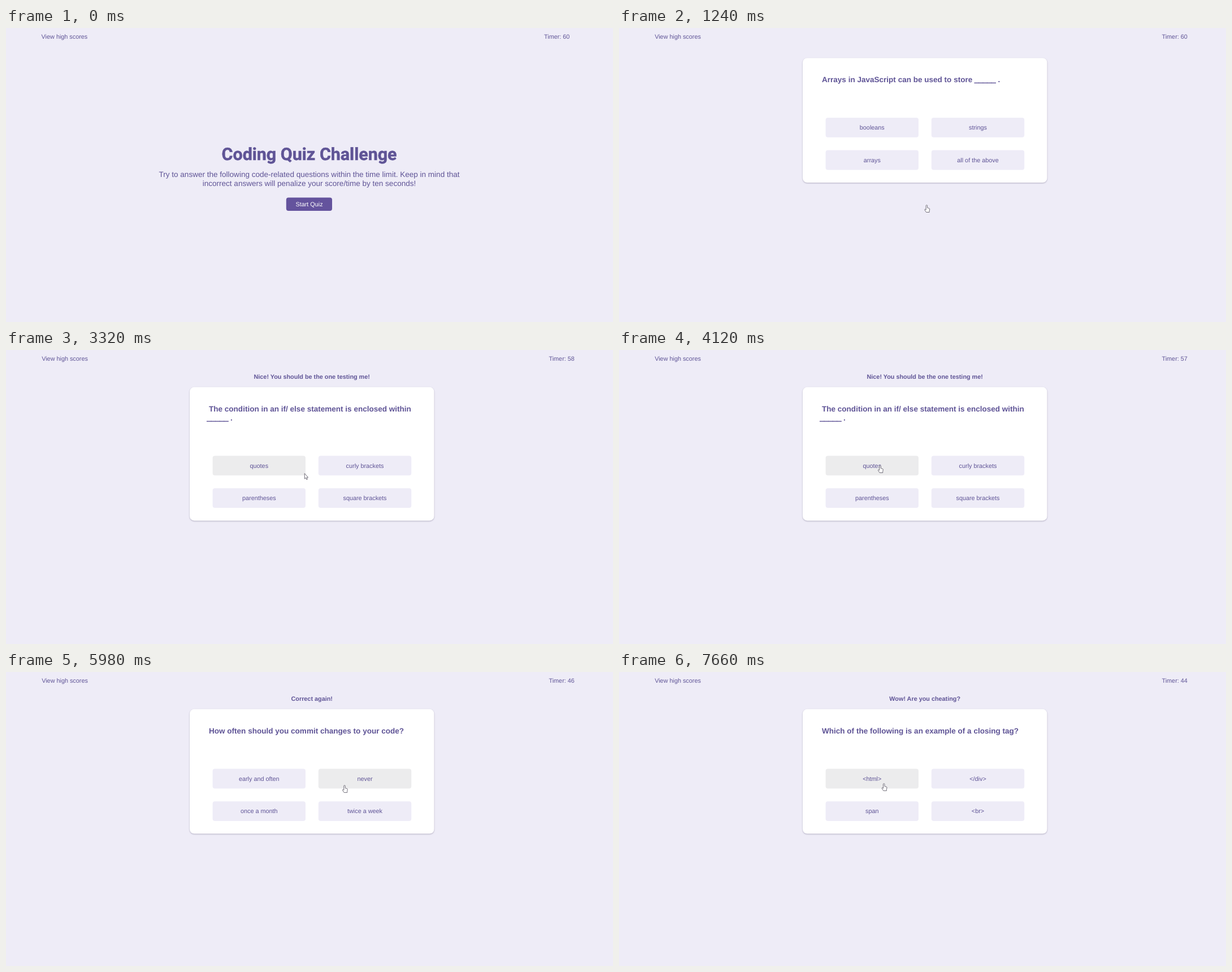
Animation of 1074x521 px, one loop 7.99 s. Source, as an HTML page:

```html
<!DOCTYPE html>
<html lang="en">
<head>
<meta charset="utf-8">
<title>Coding quiz</title>
<style>
  html, body { margin: 0; width: 100%; height: 100%; overflow: hidden; background: #eeecf7; }
  svg { display: block; width: 1074px; height: 521px; }
  text {
    font: 10.83px "Liberation Sans", Arial, sans-serif;
    fill: #5f5496; white-space: pre; text-rendering: geometricPrecision;
  }
  .mid { text-anchor: middle; }
  .end { text-anchor: end; }
  .bold { font-weight: 700; }
  .big { font-size: 13.54px; }
  .title { font: 700 30.4px Roboto, "Liberation Sans", sans-serif; stroke: #5f5496; stroke-width: .5; }
  .blank { stroke: #5f5496; stroke-width: .9; }
  .light { fill: #fff; }
  .card { fill: #fff; filter: drop-shadow(0 1px 1.2px rgba(50, 40, 80, .32)); }
  .choice { fill: #eeecf7; }
  .choice.over { fill: #ececed; }
  .start { fill: #64539d; }
  .pointer path { fill: #fff; stroke: #625f6b; stroke-width: .9; stroke-linejoin: round; }
</style>
</head>
<body>
<svg viewBox="0 0 1074 521"></svg>
<script>
const LOOP = 7990;
const LINE = 15.8, ROW = 57.6, COLUMN = 187.2;
const svg = document.querySelector('svg');

function add(parent, tag, attrs, text) {
  const el = document.createElementNS('http://www.w3.org/2000/svg', tag);
  for (const key in attrs) el.setAttribute(key, attrs[key]);
  if (text) el.textContent = text;
  parent.append(el);
  return el;
}
const label = (parent, x, y, text, cls = '') => add(parent, 'text', { x, y, class: cls }, text);
const box = (parent, x, y, width, height, rx, cls) =>
  add(parent, 'rect', { x, y, width, height, rx, class: cls });

const quiz = [
  { at: 1240, lines: ['Arrays in JavaScript can be used to store _____ .'],
    choices: ['booleans', 'strings', 'arrays', 'all of the above'] },
  { at: 2760, note: 'Nice! You should be the one testing me!',
    lines: ['The condition in an if/ else statement is enclosed within', '_____ .'],
    choices: ['quotes', 'curly brackets', 'parentheses', 'square brackets'] },
  { at: 4780, note: 'Nice try!',
    lines: ['A very useful tool used during development and',
      'debugging for printing content to the debugger is _____ .'],
    choices: ['JavaScript', 'console.log', 'terminal', 'Plenvo Sites'] },
  { at: 5980, note: 'Correct again!',
    lines: ['How often should you commit changes to your code?'],
    choices: ['early and often', 'never', 'once a month', 'twice a week'] },
  { at: 7020, note: 'Wow! Are you cheating?',
    lines: ['Which of the following is an example of a closing tag?'],
    choices: ['<html>', '</div>', 'span', '<br>'] }
];

function intro() {
  const g = add(svg, 'g');
  label(g, 536.5, 234.3, 'Coding Quiz Challenge', 'title mid');
  label(g, 536.5, 264.3, 'Try to answer the following code-related questions within the time limit. Keep in mind that', 'big mid');
  label(g, 536.5, 280.1, 'incorrect answers will penalize your score/time by ten seconds!', 'big mid');
  const start = { x: 495.8, y: 300.5, w: 81.2, h: 23.6 };
  box(g, start.x, start.y, start.w, start.h, 4, 'start');
  label(g, 536.5, 315.9, 'Start Quiz', 'mid light');
  return { at: 0, g, buttons: [start] };
}

// Question text with heavier strokes for the gap to fill in
function prompt(g, x, y, line) {
  const el = label(g, x, y, '', 'bold big');
  for (const part of line.split(/(_+)/))
    add(el, 'tspan', { class: part.startsWith('_') ? 'blank' : '' }, part);
}

function question({ at, note, lines, choices }) {
  const g = add(svg, 'g');
  const top = note ? 65.8 : 53.2;
  const extra = (lines.length - 1) * LINE;
  if (note) label(g, 541.2, 51.4, note, 'bold mid');
  box(g, 325, top, 432.5, 220.8 + extra, 8, 'card');
  lines.forEach((line, i) => prompt(g, i ? 355.6 : 359, top + 43.2 + i * LINE, line));
  const buttons = choices.map((choice, i) => {
    const b = {
      x: 365.6 + (i % 2) * COLUMN,
      y: top + 105.8 + extra + (i >> 1) * ROW,
      w: 164.4, h: 34.8
    };
    b.el = box(g, b.x, b.y, b.w, b.h, 4, 'choice');
    label(g, b.x + b.w / 2, b.y + 21.1, choice, 'mid');
    return b;
  });
  return { at, g, buttons };
}

const scores = label(svg, 0, 18.5, 'View high scores');
const timer = label(svg, 0, 18.5, '', 'end');
const scenes = [intro(), ...quiz.map(question)];

const pointer = add(svg, 'g', { class: 'pointer' });
const hand = add(pointer, 'path', {
  d: 'M-1.2 .9Q0-.6 1.2 .9V5.2L4.4 6Q5.4 6.3 5.3 7.6L4.7 11V13H-.8L-3.4 9.2Q-4 7.7-2.6 7.6L-1.2 8.8Z'
});
const arrow = add(pointer, 'path', { d: 'M0 0V9.6L2.1 7.7L3.6 11L5.1 10.3L3.7 7.2H6.3Z' });

// Places where the pointer rests
const stops = [
  { arrive: 670, leave: 670, x: 595, y: 318 },
  { arrive: 990, leave: 1400, x: 544.4, y: 313.5 },
  { arrive: 2040, leave: 2160, x: 457, y: 238 },
  { arrive: 2600, leave: 2840, x: 595, y: 233 },
  { arrive: 3800, leave: 4780, x: 462, y: 204.5 },
  { arrive: 5180, leave: 5180, x: 525.2, y: 230 },
  { arrive: 5820, leave: 5980, x: 599, y: 200.6 },
  { arrive: 6860, leave: LOOP, x: 468.7, y: 197.4 }
];

const ease = k => (1 - Math.cos(Math.PI * k)) / 2;
const sceneAt = t => scenes.findLast(s => s.at <= t);

function tip(t) {
  const i = stops.findLastIndex(s => s.arrive <= t);
  const a = stops[i], b = stops[i + 1];
  if (t <= a.leave) return { x: a.x, y: a.y, since: a.arrive };
  const k = ease((t - a.leave) / (b.arrive - a.leave));
  return { x: a.x + (b.x - a.x) * k, y: a.y + (b.y - a.y) * k, since: t };
}

const inside = (b, { x, y }, pad) =>
  x > b.x + pad && x < b.x + b.w - pad && y > b.y + pad && y < b.y + b.h - pad;

// One tick a second; the wrong answer costs ten more
function seconds(t) {
  const ticks = Math.max(0, Math.floor((t - 1120) / 1000));
  return 60 - ticks - (t >= 5120 ? 10 : 0);
}

function draw(t) {
  const scene = sceneAt(t);
  for (const s of scenes) s.g.style.display = s === scene ? '' : 'none';

  const started = scene !== scenes[0];
  scores.setAttribute('x', started ? 63.2 : 62.6);
  timer.setAttribute('x', started ? 1005.8 : 997.4);
  timer.textContent = 'Timer: ' + seconds(t);

  const visible = t >= stops[0].arrive;
  pointer.style.display = visible ? '' : 'none';
  if (!visible) return;
  const p = tip(t);
  pointer.setAttribute('transform', `translate(${p.x} ${p.y})`);
  for (const b of scene.buttons) b.el?.classList.toggle('over', inside(b, p, 0));
  // A resting pointer keeps the shape it arrived with
  const grab = sceneAt(p.since).buttons.some(b => inside(b, p, 2));
  hand.style.display = grab ? '' : 'none';
  arrow.style.display = grab ? 'none' : '';
}

const begin = performance.now();
function frame() {
  draw((performance.now() - begin) % LOOP);
  requestAnimationFrame(frame);
}
frame();
</script>
</body>
</html>
```
